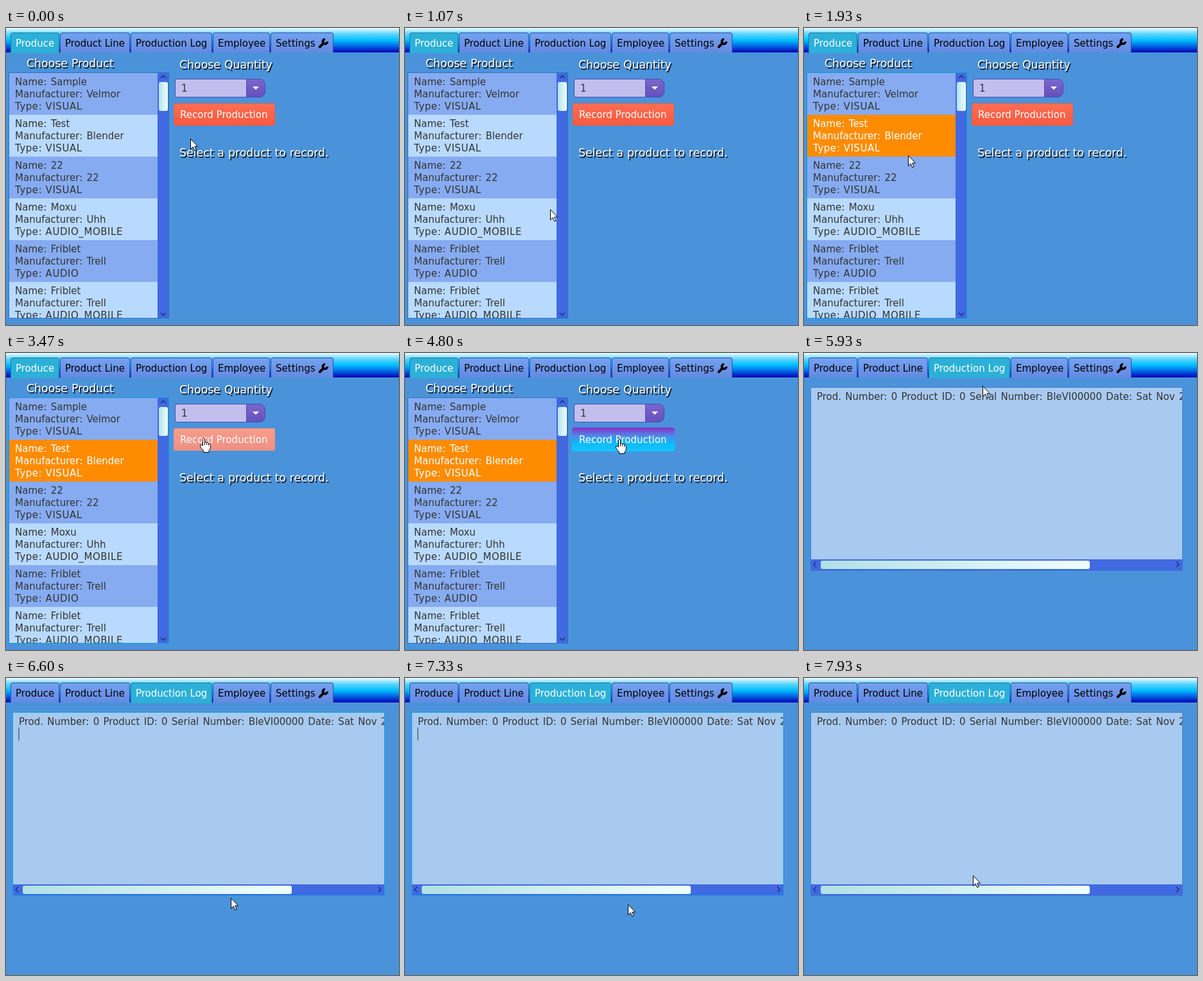
Write an HTML page with a canvas that moves like this. It is 612 px wide and 462 px high and loops after 8000 ms.

```html
<!DOCTYPE html>
<html lang="en">
<head>
<meta charset="utf-8">
<title>Production tracker</title>
<style>
  html, body { margin: 0; width: 100%; height: 100%; overflow: hidden; background: #4a93db; }
  canvas { display: block; }
</style>
</head>
<body>
<canvas id="stage" width="612" height="462"></canvas>
<script>
const ctx = document.getElementById('stage').getContext('2d');
const FPS = 15, TICKS = 120;
const FONT = '"DejaVu Sans", Verdana, sans-serif';
const INK = '#333';

// Moments of interaction, in ticks of 1/15 s
const LIST_FOCUS = 19, SELECT = 29, PRESS = 72, RELEASE = 74, OPEN_LOG = 86;
const LOG_FOCUS = 95, LOG_BLUR = 112;

const tabs = [
  ['Produce', 7, 76], ['Product Line', 84, 109], ['Production Log', 194, 127],
  ['Employee', 322, 89], ['Settings', 412, 98]
];

const products = [
  ['Sample', 'Velmor', 'VISUAL'], ['Test', 'Blender', 'VISUAL'], ['22', '22', 'VISUAL'],
  ['Moxu', 'Uhh', 'AUDIO_MOBILE'], ['Friblet', 'Trell', 'AUDIO'], ['Friblet', 'Trell', 'AUDIO_MOBILE']
];

// Pointer way-points: tick, x, y
const path = [
  [8, 287, 172], [10, 138, 99], [13, 138, 99], [16, 226, 282], [21, 226, 282],
  [23, 157, 130], [25, 162, 198], [36, 162, 198], [41, 226, 403], [42, 226, 403],
  [44, 180, 434], [50, 402, 132], [51, 402, 132], [52, 308, 132], [58, 308, 132],
  [63, 320, 235], [68, 334, 134], [79, 334, 134], [85, 268, 18], [88, 268, 18],
  [95, 340, 250], [99, 350, 342], [101, 350, 342], [104, 580, 320], [105, 580, 320],
  [111, 300, 358], [118, 577, 320], [119, 263, 307]
];

function pointerAt(tick) {
  if (tick <= path[0][0]) return path[0].slice(1);
  const i = path.findIndex(p => p[0] >= tick);
  const [t0, x0, y0] = path[i - 1], [t1, x1, y1] = path[i];
  const k = (tick - t0) / (t1 - t0);
  return [Math.round(x0 + (x1 - x0) * k), Math.round(y0 + (y1 - y0) * k)];
}

const inside = ([px, py], x, y, w, h) => px >= x && px < x + w && py >= y && py < y + h;

function gradient(x0, y0, x1, y1, ...colors) {
  const g = ctx.createLinearGradient(x0, y0, x1, y1);
  colors.forEach((c, i) => g.addColorStop(i / (colors.length - 1), c));
  return g;
}

function rect(x, y, w, h, fill) {
  ctx.fillStyle = fill;
  ctx.fillRect(x, y, w, h);
}

function round(x, y, w, h, r, fill) {
  ctx.beginPath();
  ctx.roundRect(x, y, w, h, r);
  ctx.fillStyle = fill;
  ctx.fill();
}

function frame(x, y, w, h, color) {
  ctx.strokeStyle = color;
  ctx.lineWidth = 1;
  ctx.strokeRect(x + .5, y + .5, w - 1, h - 1);
}

function text(str, x, y, color, { size = 15, word = 0, letter = 0 } = {}) {
  ctx.font = `${size}px ${FONT}`;
  ctx.wordSpacing = `${word}px`;
  ctx.letterSpacing = `${letter}px`;
  ctx.fillStyle = color;
  ctx.fillText(str, x, y);
}

function label(str, x, y) {
  ctx.save();
  ctx.shadowColor = '#000';
  ctx.shadowOffsetX = ctx.shadowOffsetY = 1.5;
  ctx.shadowBlur = 1;
  text(str, x, y, '#fff', { size: 17.33, word: .4 });
  ctx.restore();
}

function line(color, width, ...pts) {
  ctx.beginPath();
  for (const [x, y] of pts) ctx.lineTo(x, y);
  ctx.strokeStyle = color;
  ctx.lineWidth = width;
  ctx.stroke();
}

// dx, dy give the direction the chevron points to
function chevron(x, y, dx, dy) {
  line('#1c2a78', 1.3,
    [x - 2 * dx - 4 * dy, y - 2 * dy - 4 * dx],
    [x + 2 * dx, y + 2 * dy],
    [x - 2 * dx + 4 * dy, y - 2 * dy + 4 * dx]);
}

function wrench(x, y) {
  ctx.save();
  ctx.translate(x, y);
  ctx.rotate(-Math.PI / 4);
  ctx.lineCap = 'round';
  line('#000', 4, [-7.5, 0], [1, 0]);
  ctx.lineCap = 'butt';
  ctx.beginPath();
  ctx.arc(4, 0, 3.6, .75, Math.PI * 2 - .75);
  ctx.lineWidth = 3.4;
  ctx.stroke();
  ctx.restore();
}

const tabLook = {
  open: { edge: '#147ea8', top: '#2cb0d8', bottom: '#2cb0d8', ink: '#fff' },
  hover: { edge: '#7c9ce0', top: '#9ab4e6', bottom: '#86a4e0', ink: '#1c2440' },
  idle: { edge: '#2a4fae', top: '#74a2ef', bottom: '#6489e2', ink: '#000' }
};

function drawTabs(open, mouse) {
  rect(0, 0, 612, 38, gradient(0, 0, 0, 38, '#f0fbff', '#5cd4ff', '#00bfff', '#0062e4', '#0000b4'));
  tabs.forEach(([name, x, w], i) => {
    const state = i === open ? 'open' : inside(mouse, x, 7, w, 31) ? 'hover' : 'idle';
    const look = tabLook[state], h = i === open ? 32 : 31;
    round(x, 7, w, h, [4, 4, 0, 0], look.edge);
    round(x + 1, 8, w - 2, h - 1, [3, 3, 0, 0], gradient(0, 8, 0, 38, look.top, look.bottom));
    text(name, x + 8, 29, look.ink);
  });
  wrench(494, 24);
}

function drawList(tick) {
  const focused = tick >= LIST_FOCUS && tick < PRESS;
  rect(4, 69, 250, 383, focused ? '#0f9ad8' : '#2f70c0');
  ctx.save();
  ctx.beginPath();
  ctx.rect(5, 70, 248, 381);
  ctx.clip();
  products.forEach(([name, maker, type], i) => {
    const y = 70 + i * 65, chosen = i === 1 && tick >= SELECT;
    const ink = chosen ? '#fff' : INK;
    rect(5, y, 231, 65, chosen ? '#ff8c00' : i % 2 ? '#b9daff' : '#86abf1');
    if (i === 0 && focused && tick < SELECT) frame(5, y, 231, 65, '#0f9ad8');
    text('Name: ' + name, 14, y + 19, ink, { word: 1.7 });
    text('Manufacturer: ' + maker, 14, y + 38, ink, { word: 1.4 });
    text('Type: ' + type, 14, y + 57, ink, { letter: .55 });
  });
  rect(236, 70, 17, 381, '#4169e1');
  round(238, 84, 14, 45, 3, gradient(238, 0, 252, 0, '#b2e2ea', '#f0ffff'));
  chevron(245, 76, 0, -1);
  chevron(245, 445, 0, 1);
  ctx.restore();
}

function drawCombo() {
  round(263, 79, 141, 29, [3, 9, 9, 3], '#4c4cb4');
  round(264, 80, 110, 27, [2, 0, 0, 2], '#c4beee');
  round(375, 80, 28, 27, [0, 8, 8, 0], gradient(0, 80, 0, 107, '#7a66cc', '#6650bc'));
  ctx.beginPath();
  ctx.moveTo(384, 91);
  ctx.lineTo(394, 91);
  ctx.lineTo(389, 96);
  ctx.fillStyle = '#fff';
  ctx.fill();
  text('1', 273, 99, INK);
}

function drawButton(tick, hover) {
  if (tick >= PRESS && tick < RELEASE) {
    round(260, 116, 160, 37, 4, gradient(0, 116, 0, 153, '#8c2cc6', '#4f86e6', '#0cbcff', '#14c6ff'));
  } else {
    if (tick >= RELEASE) round(260, 116, 160, 37, 4, '#6f93a0');
    round(261, 117, 158, 35, 3, hover ? '#e8948a' : '#e2604a');
    round(262, 118, 156, 33, 2, hover
      ? gradient(0, 118, 0, 151, '#fa9c8a', '#ee9084')
      : gradient(0, 118, 0, 151, '#ff6e54', '#f8593e'));
  }
  text('Record Production', 271, 140, '#fff');
}

function drawProduce(tick, mouse, overButton) {
  label('Choose Product', 32, 61);
  label('Choose Quantity', 270, 63);
  drawList(tick);
  drawCombo();
  drawButton(tick, overButton);
  if (tick < RELEASE) {
    label('Select a product to record.', 270, 200);
  } else {
    label('Check the Production Log', 270, 200);
    label('tab!', 270, 223);
  }
}

function drawLog(tick) {
  const focused = tick >= LOG_FOCUS && tick < LOG_BLUR;
  round(10, 53, 580, 286, 2, focused ? '#0fa2e2' : '#3f7cc8');
  rect(11, 54, 578, 267, '#a8caf0');
  ctx.save();
  ctx.beginPath();
  ctx.rect(11, 54, 578, 267);
  ctx.clip();
  text('Prod. Number: 0 Product ID: 0 Serial Number: BleVI00000 Date: Sat Nov 23', 20, 73, INK, { word: 1.5 });
  ctx.restore();
  if (focused && (tick - LOG_FOCUS) % 15 < 8) rect(19, 77, 2, 20, '#6c7c92');
  rect(11, 321, 578, 17, '#4169e1');
  round(26, 323, 419, 13, 3, gradient(26, 0, 445, 0, '#b0e0e6', '#f0ffff'));
  chevron(17, 329, -1, 0);
  chevron(582, 329, 1, 0);
}

const arrow = new Path2D('M.5 .5V16.5L4.2 13 6.8 18.8 9.2 17.8 6.7 12.1H11.5Z');
const hand = new Path2D('M-1.5 12V1.5Q0 -1 1.5 1.5V7Q3.5 5.5 4.5 7.6 6.5 6.5 7.5 8.6 9.8 8 10.3 10.5' +
  'V16Q9.5 19 8 20V22.5H-.5V20Q-4 16.5-5.5 13.5-6.2 10.5-3.8 10.8Z');

function drawPointer([x, y], overButton) {
  const shape = overButton ? hand : arrow;
  ctx.save();
  ctx.translate(x, y);
  ctx.fillStyle = '#fff';
  ctx.fill(shape);
  ctx.strokeStyle = '#000';
  ctx.lineWidth = 1;
  ctx.stroke(shape);
  if (overButton) {
    line('#000', 1, [1.5, 7], [1.5, 11]);
    line('#000', 1, [4.5, 8], [4.5, 11]);
    line('#000', 1, [7.5, 9], [7.5, 12]);
  }
  ctx.restore();
}

function draw(tick) {
  const mouse = pointerAt(tick), logOpen = tick >= OPEN_LOG;
  const overButton = !logOpen && inside(mouse, 261, 117, 158, 35);
  rect(0, 0, 612, 462, '#4a93db');
  drawTabs(logOpen ? 2 : 0, mouse);
  if (logOpen) drawLog(tick);
  else drawProduce(tick, mouse, overButton);
  drawPointer(mouse, overButton);
}

const start = performance.now();
function loop() {
  const ms = performance.now() - start;
  draw(Math.floor(ms * FPS / 1000 + .05) % TICKS);
  requestAnimationFrame(loop);
}
loop();
</script>
</body>
</html>
```
